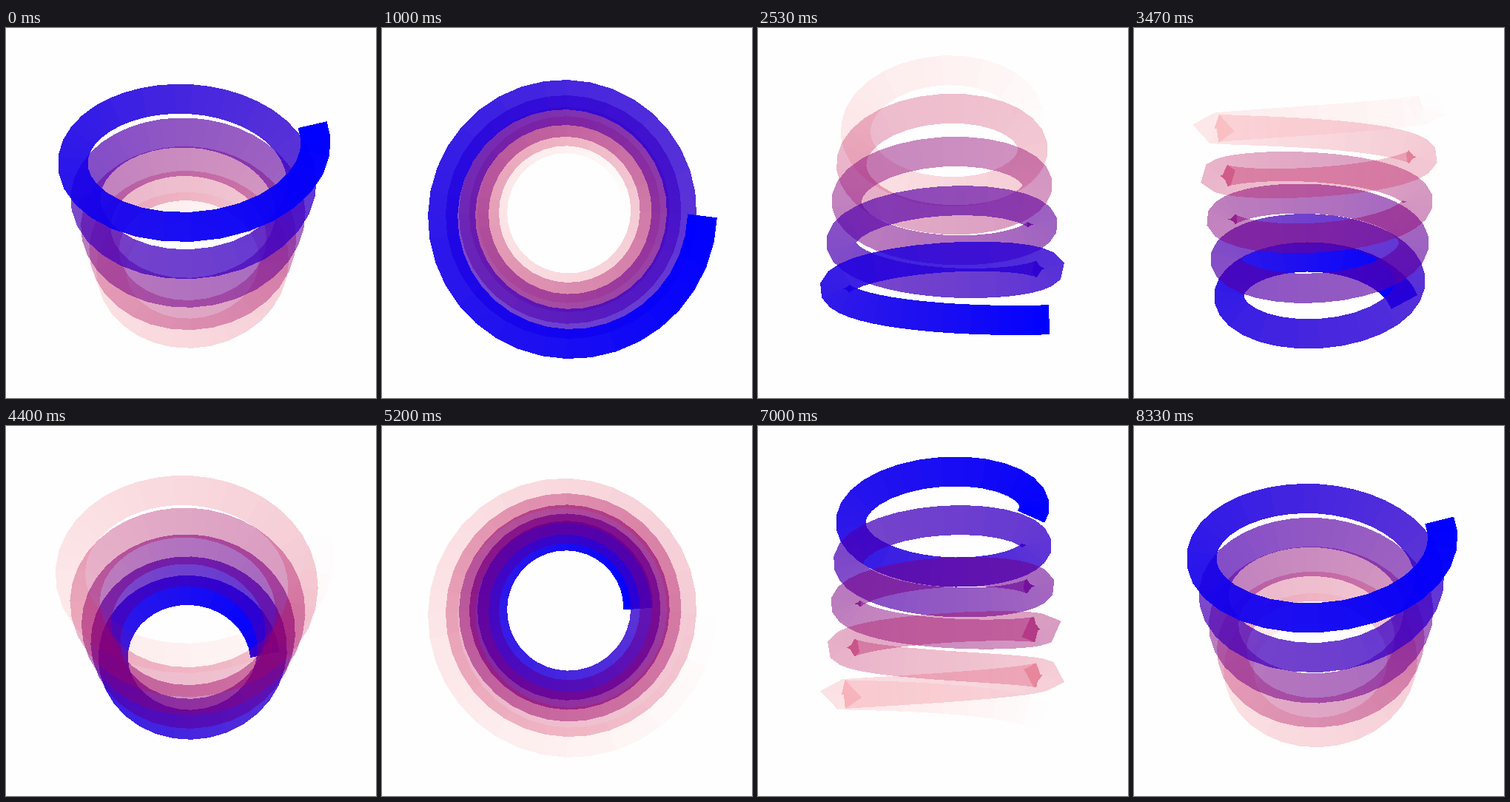
Animation, 500 px wide and 500 px high, one loop 8.39 s. Source, as an HTML page:

```html
<!DOCTYPE html>
<html>
<head>
<meta charset="utf-8">
<style>
html, body { margin: 0; width: 100%; height: 100%; overflow: hidden; background: #fefefe; }
svg { display: block; width: 100vw; height: 100vh; }
</style>
</head>
<body>
<svg viewBox="0 0 500 500" shape-rendering="crispEdges"></svg>
<script>
const svg = document.querySelector('svg');
const LOOP = 8390, TURNS = 5, SEGMENTS = 180, HALF_WIDTH = 20;
const HALF_HEIGHT = 1.09, FOCAL = 442, DISTANCE = 3.505; // in helix radii

// opaque blue fading to transparent red along the ribbon
const fills = Array.from({ length: SEGMENTS }, (_, i) => {
  const u = (i + .5) / SEGMENTS, red = Math.round(255 * u);
  return `fill="rgb(${red},0,${255 - red})" fill-opacity="${(1 - u).toFixed(3)}"`;
});

function project(i, tilt) {
  const u = i / SEGMENTS, angle = u * TURNS * 2 * Math.PI;
  const axial = HALF_HEIGHT * (1 - 2 * u);
  const sin = Math.sin(tilt), cos = Math.cos(tilt);
  const y = axial * cos - Math.sin(angle) * sin;
  const z = axial * sin + Math.sin(angle) * cos;
  const scale = FOCAL / (DISTANCE - z);
  return { x: 250 + Math.cos(angle) * scale, y: 250 - y * scale, z };
}

function direction(a, b) {
  const dx = b.x - a.x, dy = b.y - a.y, len = Math.hypot(dx, dy) || 1;
  return { x: dx / len, y: dy / len };
}

// the two ribbon edges at a point, with mitred joints
function edges(points, i) {
  const p = points[i];
  const next = direction(points[Math.min(i, SEGMENTS - 1)], points[Math.min(i + 1, SEGMENTS)]);
  const prev = i ? direction(points[i - 1], p) : next;
  const t = direction({ x: 0, y: 0 }, { x: prev.x + next.x, y: prev.y + next.y });
  const w = HALF_WIDTH / Math.max(.7, t.x * next.x + t.y * next.y);
  const at = side => `${(p.x - side * t.y * w).toFixed(2)},${(p.y + side * t.x * w).toFixed(2)}`;
  return [at(1), at(-1)];
}

function draw(step) {
  const tilt = .84 + step * .05;
  const points = Array.from({ length: SEGMENTS + 1 }, (_, i) => project(i, tilt));
  const rims = points.map((_, i) => edges(points, i));
  svg.innerHTML = fills
    .map((fill, i) => ({
      z: points[i].z + points[i + 1].z,
      shape: `<polygon points="${rims[i][0]} ${rims[i + 1][0]} ${rims[i + 1][1]} ${rims[i][1]}" ${fill}/>`
    }))
    .sort((a, b) => a.z - b.z)
    .map(s => s.shape)
    .join('');
}

let shown = -1;
const start = performance.now();
function tick() {
  const t = (performance.now() - start) % LOOP;
  // 15 steps a second, each starting on a whole hundredth
  const step = Math.floor((Math.floor(t / 10) + .5) * .15);
  if (step !== shown) draw(shown = step);
  requestAnimationFrame(tick);
}
tick();
</script>
</body>
</html>
```
